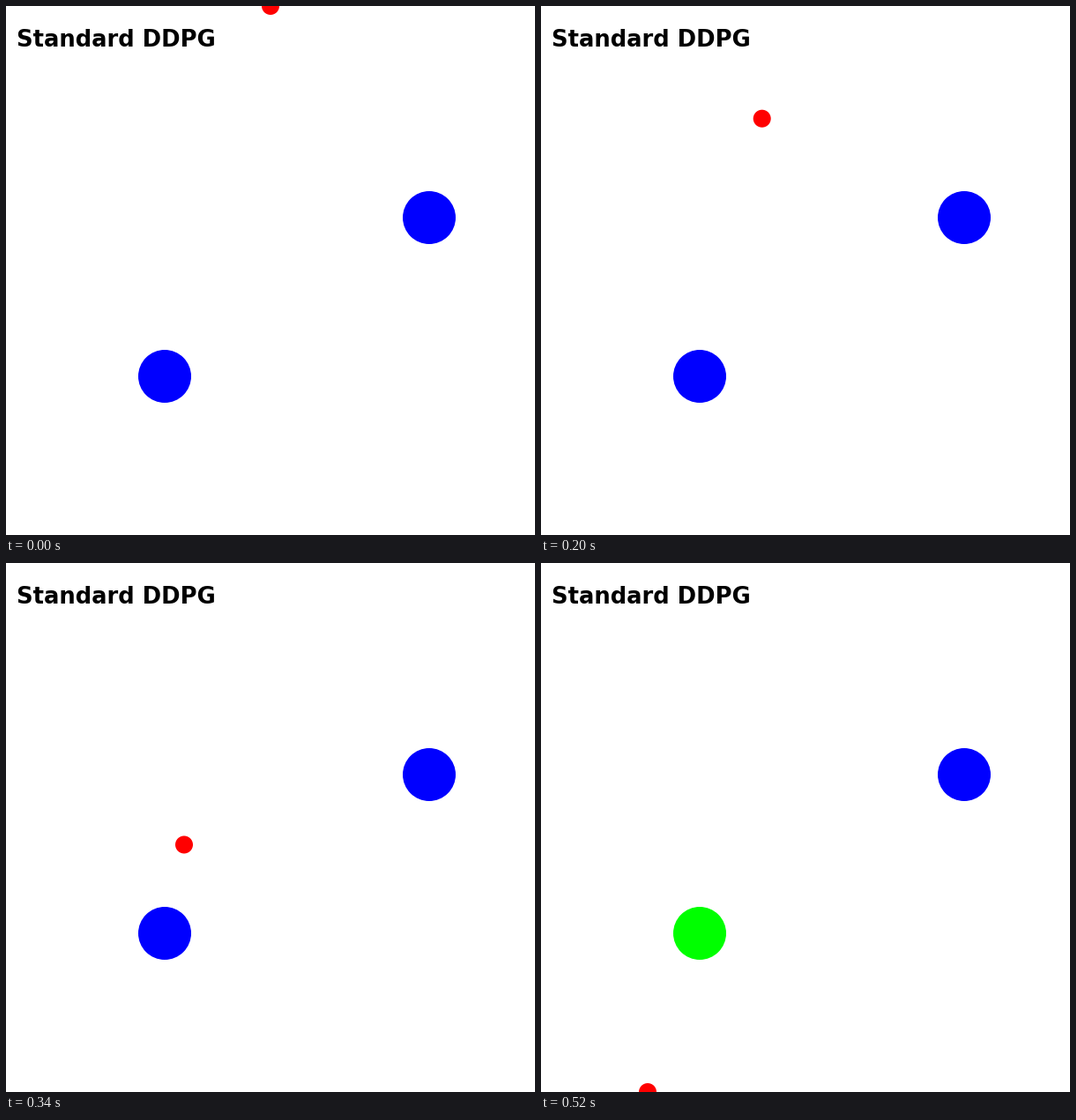
Write a matplotlib script that moves like this. It is 600 by 600 pixels and loops after 540 ms.

```python
import numpy as np
import matplotlib.pyplot as plt
from matplotlib.animation import FuncAnimation
from matplotlib.patches import Circle

SIZE, DPI = 600, 100
FRAMES, INTERVAL = 27, 20
REACHED = 20  # step at which the lower goal turns green

# Waypoints of the agent: step, x, y
STEPS = np.array([0, 4, 7, 13, 17, 22, 26], float)
XS = np.array([300, 292, 274, 227, 202, 156, 121], float)
YS = np.array([0, 25, 66, 204, 319.5, 478, 600], float)


def smooth(values, step):
    """Cubic Hermite curve through the waypoints."""
    slopes = np.gradient(values, STEPS, edge_order=2)
    i = min(np.searchsorted(STEPS, step, side="right") - 1, len(STEPS) - 2)
    h = STEPS[i + 1] - STEPS[i]
    t = (step - STEPS[i]) / h
    return ((2 * t**3 - 3 * t**2 + 1) * values[i]
            + (t**3 - 2 * t**2 + t) * h * slopes[i]
            + (3 * t**2 - 2 * t**3) * values[i + 1]
            + (t**3 - t**2) * h * slopes[i + 1])


fig = plt.figure(figsize=(SIZE / DPI, SIZE / DPI), dpi=DPI, facecolor="white")
ax = fig.add_axes([0, 0, 1, 1])
ax.set_xlim(0, SIZE)
ax.set_ylim(SIZE, 0)
ax.axis("off")


def disc(x, y, radius, color, z):
    return ax.add_patch(Circle((x, y), radius, facecolor=color, linewidth=0,
                               zorder=z))


far_goal = disc(480, 240, 30, "#0000ff", 1)
near_goal = disc(180, 420, 30, "#0000ff", 1)
agent = disc(300, 0, 10, "#ff0000", 2)
ax.text(12, 46, "Standard DDPG", family="DejaVu Sans", weight="bold",
        size=25.9 * 72 / DPI, color="black", va="baseline", zorder=3)


def draw(step):
    agent.center = (smooth(XS, step), smooth(YS, step))
    near_goal.set_facecolor("#00ff00" if step >= REACHED else "#0000ff")
    return agent, near_goal


anim = FuncAnimation(fig, draw, frames=FRAMES, interval=INTERVAL,
                     repeat=True, repeat_delay=0)
plt.show()
```
